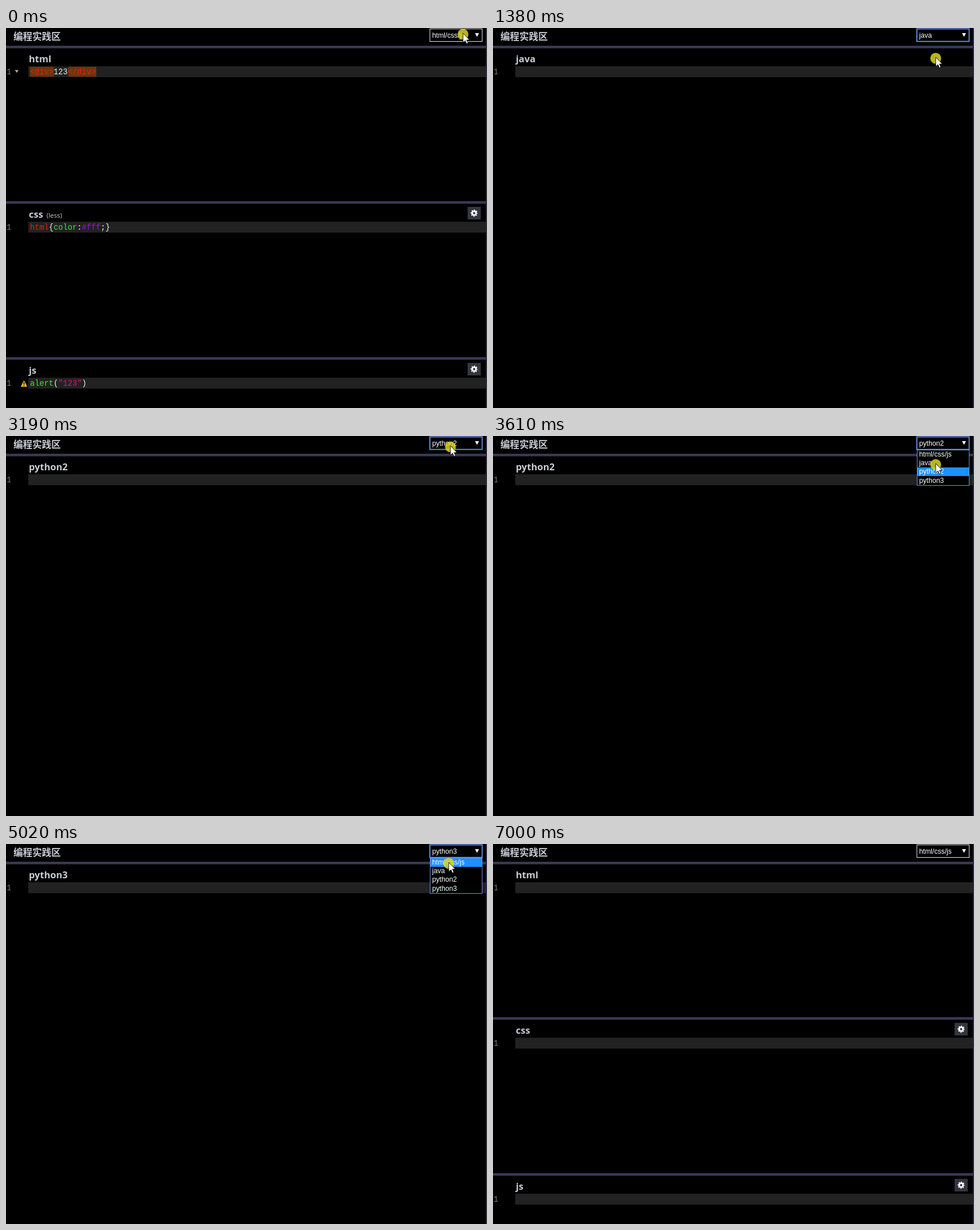
These frames come from a looping animation (842 px wide and 665 px high, 8.01 s). An HTML page:

```html
<!DOCTYPE html>
<html lang="zh-CN">
<head>
<meta charset="utf-8">
<title>编程实践区</title>
<style>
  html, body { margin: 0; width: 100%; height: 100%; overflow: hidden; background: #000; }
  svg { display: block; width: 842px; height: 665px; }
  text { white-space: pre; }
  .title { font: bold 16.6px "Noto Sans CJK SC", "Noto Sans CJK", sans-serif; fill: #c8ccd4; }
  .heading { font: bold 16.5px "Open Sans", "Noto Sans", sans-serif; fill: #c8ccd4; }
  .note { font: 11.5px "Open Sans", "Noto Sans", sans-serif; fill: #c8ccd4; }
  .code { font: 13.75px "Liberation Mono", monospace; fill: #eee; }
  .menu { font: 12.2px "Liberation Sans", Arial, sans-serif; fill: #fff; }
  .number { fill: #777; }
  .divider { fill: #3b3853; }
  .red { fill: #e5200f; }
  .green { fill: #3be83b; }
  .purple { fill: #a90ae6; }
  .pink { fill: #dc1480; }
</style>
</head>
<body>
<svg viewBox="0 0 842 665">
  <defs>
    <g id="pane">
      <rect class="divider" y="31" width="840" height="4.5"/>
      <rect x="39" y="67" width="801" height="19" fill="#222"/>
      <text class="code number" x="1" y="81">1</text>
    </g>
    <g id="gear">
      <rect x="808" y="41" width="23" height="22" fill="#34363f"/>
      <g transform="translate(819.5 52)">
        <circle r="3.4" fill="none" stroke="#fff" stroke-width="2.7"/>
        <circle r="5.2" fill="none" stroke="#fff" stroke-width="2" stroke-dasharray="2.1 1.984" stroke-dashoffset="1.05"/>
      </g>
    </g>
  </defs>
  <rect width="842" height="665"/>
  <rect class="divider" x="840" width="2" height="665" opacity=".8"/>
  <text class="title" x="13" y="21">编程实践区</text>

  <use href="#pane"/>
  <text class="heading" id="heading" x="40" y="60"></text>

  <g id="lowerPanes">
    <g transform="translate(0 272)">
      <use href="#pane"/><use href="#gear"/>
      <text class="heading" x="40" y="60">css</text>
    </g>
    <g transform="translate(0 545)">
      <use href="#pane"/><use href="#gear"/>
      <text class="heading" x="40" y="60">js</text>
    </g>
  </g>

  <g id="sample">
    <path d="M15.500 73.500h6.500l-3.250 5z" fill="#aaa"/>
    <path d="M42 68h41.500v17h-41.500zM109 68h49v17h-49z" fill="#6a3708"/>
    <text class="code" x="42" y="81"><tspan class="red">&lt;div&gt;</tspan>123<tspan class="red">&lt;/div&gt;</tspan></text>
    <text class="note" x="71" y="331.500">(less)</text>
    <text class="code" x="42" y="353"><tspan class="red">html</tspan>{<tspan class="green">color</tspan>:<tspan class="purple">#fff</tspan>;}</text>
    <path d="M31.500 617.500L36.500 627.300H26.500Z" fill="#f3b71b" stroke="#f3b71b" stroke-linejoin="round"/>
    <path d="M31.500 620v4M31.500 625.200v1.500" stroke="#000" stroke-width="1.500"/>
    <text class="code" x="42" y="626"><tspan class="green">alert</tspan>(<tspan class="pink">"123"</tspan>)</text>
  </g>

  <rect id="selectBox" x="742" y="1.500" width="91.500" height="22"/>
  <text class="menu" id="choice" x="746" y="17"></text>
  <path d="M821 9h7l-3.500 6.500z" fill="#fff"/>

  <g id="menu">
    <rect x="742.500" y="24.500" width="91" height="62" fill="#000" stroke="#6f93dc"/>
    <rect id="highlight" x="743" width="90" height="15" fill="#1e90ff"/>
  </g>

  <g id="pointer">
    <circle id="halo" r="9.500" fill-opacity=".85"/>
    <path id="arrow" d="M0-2V14.500L3.800 11 6.300 16.600 9 15.400 6.500 10H11.500Z" fill="#fff" stroke="#000" stroke-width=".9"/>
    <path id="beam" d="M-3.500-7.500Q0-7.500 0-5.500Q0-7.500 3.500-7.500M0-5.500V5.500M-3.500 7.500Q0 7.500 0 5.500Q0 7.500 3.500 7.500" fill="none" stroke="#67651f" stroke-width="1.200"/>
  </g>
</svg>
<script>
const LOOP = 8010;
const OPTIONS = ['html/css/js', 'java', 'python2', 'python3'];
const el = id => document.getElementById(id);
const show = (id, on) => el(id).setAttribute('display', on ? 'inline' : 'none');
const set = (id, attrs) => {
  for (const name in attrs) el(id).setAttribute(name, attrs[name]);
};

// Each entry: start time, pointer x and y, then whatever changes from there on.
// hover is the highlighted option of the open menu, -1 when closed.
const steps = [
  [0, 800, 11, { choice: 0, sample: true, focus: false, hover: -1 }],
  [580, 800, 11, { focus: true, hover: 0, press: true }],
  [980, 785, 38, { hover: 0 }],
  [1200, 775, 53, { hover: 1, press: true }],
  [1380, 775, 53, { hover: -1, choice: 1, sample: false }],
  [1590, 777, 36, {}],
  [1790, 778, 19, {}],
  [2000, 778, 18, { hover: 1, press: true }],
  [2180, 779, 44, {}],
  [2390, 779, 61, { hover: 2 }],
  [2590, 779, 63, { press: true }],
  [2790, 779, 62, { hover: -1, choice: 2 }],
  [2990, 778, 38, {}],
  [3190, 778, 19, {}],
  [3400, 778, 18, { hover: 2, press: true }],
  [3600, 775, 50, {}],
  [3800, 769, 76, { hover: 3 }],
  [4000, 768, 78, { press: true }],
  [4210, 768, 66, { hover: -1, choice: 3, beam: true }],
  [4410, 771, 38, {}],
  [4620, 774, 16, {}],
  [4820, 774, 16, { hover: 3, press: true }],
  [5020, 775, 34, { hover: 0 }],
  [5210, 775, 37, { press: true }],
  [5610, 775, 37, { hover: -1, choice: 0 }],
  [6010, 757, 110, { beam: true }],
  [6210, 685, 380, { beam: true }],
  [6410, 600, 656, {}],
  [6610, 0, 0, { hidden: true }],
  [7000, 0, 0, { hidden: true, focus: false }]
];

// Choice, focus and menu persist; press, beam and hidden last one step.
let kept = {};
const states = steps.map(([time, x, y, change]) => {
  const state = { ...kept, time, x, y, press: false, beam: false, hidden: false, ...change };
  const { choice, sample, focus, hover } = state;
  kept = { choice, sample, focus, hover };
  return state;
});

const optionTexts = OPTIONS.map((label, i) => {
  const text = document.createElementNS('http://www.w3.org/2000/svg', 'text');
  text.textContent = label;
  text.setAttribute('class', 'menu');
  text.setAttribute('x', 746);
  text.setAttribute('y', 36 + 15.2 * i);
  return text;
});
el('menu').append(...optionTexts);

function draw(s) {
  const label = OPTIONS[s.choice];
  el('heading').textContent = s.choice ? label : 'html';
  el('choice').textContent = label;
  show('lowerPanes', s.choice === 0);
  show('sample', s.sample);
  show('menu', s.hover >= 0);
  set('highlight', { y: 25 + 15 * Math.max(s.hover, 0) });
  set('selectBox', { stroke: s.focus ? '#6795e8' : '#e8e8e8', 'stroke-width': s.focus ? 1.8 : 1 });
  show('pointer', !s.hidden);
  set('pointer', { transform: `translate(${s.x} ${s.y})` });
  set('halo', { fill: s.press ? '#ff4b26' : '#d9d51f' });
  show('arrow', !s.beam);
  show('beam', s.beam);
}

let current;
function tick() {
  const time = performance.now() % LOOP;
  const state = states.filter(s => s.time <= time).pop();
  if (state !== current) draw(current = state);
  requestAnimationFrame(tick);
}
tick();
</script>
</body>
</html>
```
